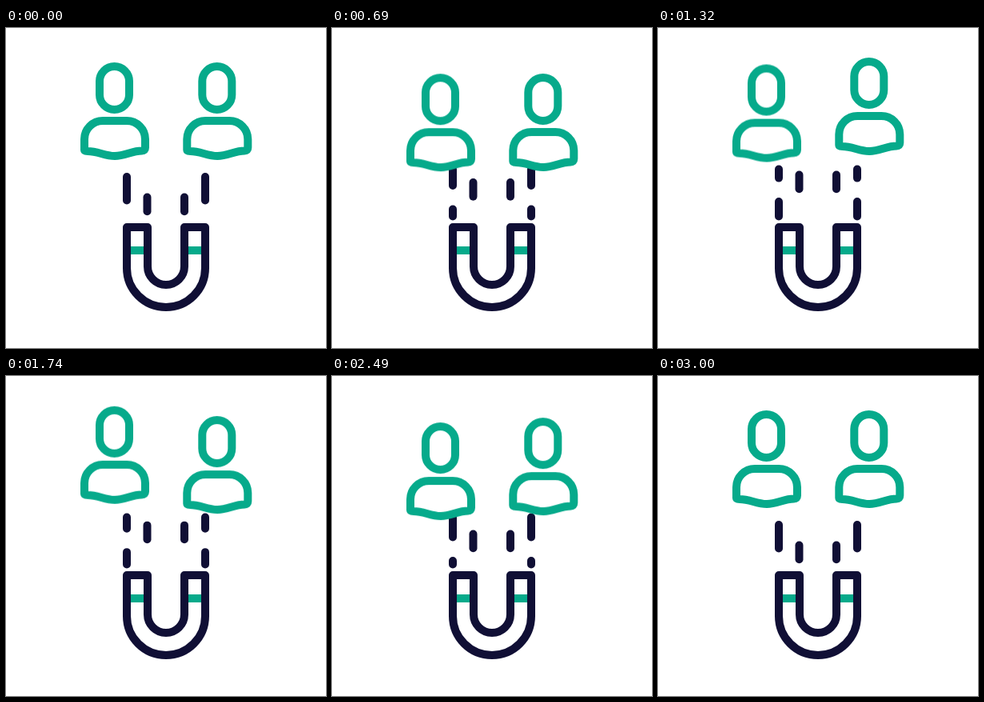
An HTML page without scripts for the animation above (3090 ms loop, 400 px wide and 400 px high).

```html
<!DOCTYPE html>
<html lang="en">
<head>
<meta charset="utf-8">
<title>Magnet</title>
<style>
  html, body { margin: 0; width: 100%; height: 100%; overflow: hidden; background: #fff; }
  svg { display: block; width: 100vw; height: 100vh; }
  svg * { fill: none; stroke-width: 10; stroke-linecap: round; stroke-linejoin: round; }
  .green { stroke: #06aa8b; }
  .navy { stroke: #100f35; }

  .person { animation: 3090ms cubic-bezier(.364, 0, .636, 1) infinite; }
  .left { animation-name: bob-left; }
  .right { animation-name: bob-right; }
  @keyframes bob-left {
    0%, 97.09%, 100% { transform: translateY(0); }
    28.48%, 77.67% { transform: translateY(16px); }
    53.4% { transform: translateY(-6px); }
  }
  @keyframes bob-right {
    0%, 97.09%, 100% { transform: translateY(0); }
    17.48%, 66.99% { transform: translateY(16px); }
    42.72% { transform: translateY(-6px); }
  }

  /* Dashes wrap every 59 units and make four turns per loop */
  .pull { animation: pull 3090ms linear infinite; }
  .outer { --start: -9.5px; stroke-dasharray: 29.5 29.5; }
  .inner { --start: -35px; stroke-dasharray: 17.7 41.3; }
  @keyframes pull {
    0% { stroke-dashoffset: var(--start); animation-timing-function: cubic-bezier(.333, .28, .667, .63); }
    22.33% { stroke-dashoffset: calc(var(--start) - 40.5px); animation-timing-function: cubic-bezier(.333, .274, .667, .494); }
    42.72% { stroke-dashoffset: calc(var(--start) - 90px); animation-timing-function: cubic-bezier(.333, .272, .667, .7); }
    56.31% { stroke-dashoffset: calc(var(--start) - 152px); animation-timing-function: cubic-bezier(.333, .39, .667, .714); }
    66.99% { stroke-dashoffset: calc(var(--start) - 189px); animation-timing-function: cubic-bezier(.333, .41, .667, .767); }
    80.58% { stroke-dashoffset: calc(var(--start) - 222px); animation-timing-function: cubic-bezier(.333, .68, .667, 1); }
    97.09%, 100% { stroke-dashoffset: calc(var(--start) - 236px); }
  }
</style>
</head>
<body>
<svg viewBox="0 0 400 400">
  <defs>
    <g id="person">
      <rect x="117" y="48" width="37" height="54" rx="18.5"/>
      <path d="M98 152.500V139a23 23 0 0 1 23-23h30a23 23 0 0 1 23 23V149.500Q174 153.500 170 153.500C157 153.500 149 160 136 160C123 160 115 154 102 154Q98 154 98 152.500Z"/>
    </g>
  </defs>

  <g class="navy">
    <path class="pull outer" d="M151 176.500V235.500"/>
    <path class="pull inner" d="M176.500 176.500V235.500"/>
    <path class="pull inner" d="M223 176.500V235.500"/>
    <path class="pull outer" d="M249 176.500V235.500"/>
  </g>

  <path class="green" d="M152 278H176M224 278H248"/>
  <path class="navy" d="M151 249H177V298a23 23 0 0 0 46 0V249H249V300a49 49 0 0 1-98 0Z"/>

  <g class="person left green"><use href="#person"/></g>
  <g class="person right green"><use href="#person" x="128.300"/></g>
</svg>
</body>
</html>
```
